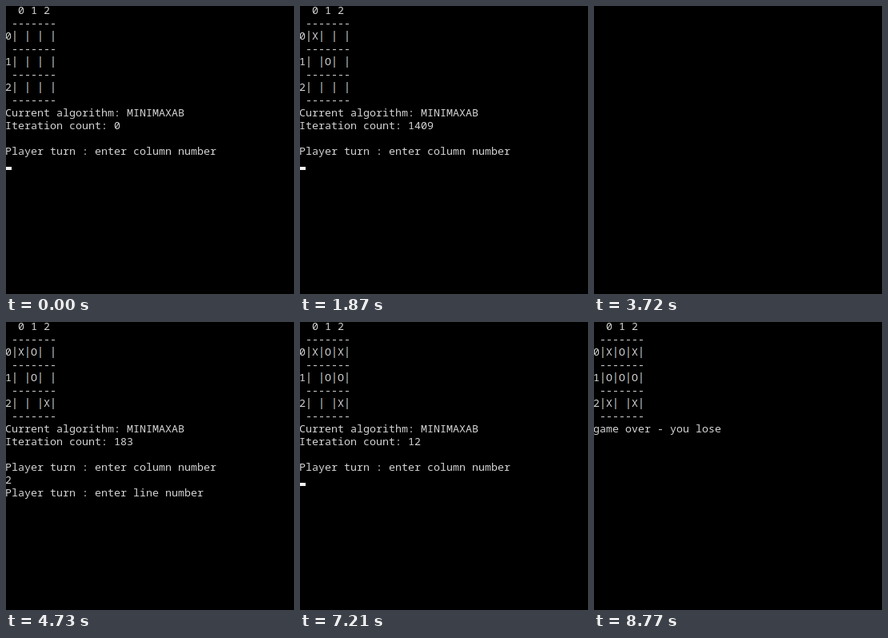
Recreate the animation shown at these times as an HTML page. Size 360 by 360 pixels, loop 9230 ms.

```html
<!DOCTYPE html>
<html>
<head>
<meta charset="utf-8">
<style>
html, body { margin: 0; width: 100%; height: 100%; overflow: hidden; background: #000; }
pre {
  position: absolute; left: -1px; top: -3px; margin: 0; color: #d4d4d4;
  font: calc(40px / 3)/16px "Noto Sans Mono", "DejaVu Sans Mono", monospace;
}
/* Bars carry the blue and orange fringes of subpixel text */
pre i {
  font-style: normal; font-weight: bold; color: transparent;
  background: linear-gradient(90deg, #68aada 50%, #c48a50 50%);
  -webkit-background-clip: text; background-clip: text;
}
#cursor { position: absolute; width: 8px; height: 4px; background: #f4f4f4; }
</style>
</head>
<body>
<pre id="screen"></pre>
<div id="cursor"></div>
<script>
const LOOP = 9230;
const screenEl = document.getElementById('screen');
const cursorEl = document.getElementById('cursor');

const board = cells => {
  const rule = '\n -------\n';
  const rows = [0, 1, 2].map(r => r + '|' + [...cells.slice(r * 3, r * 3 + 3)].join('|') + '|');
  return '  0 1 2' + rule + rows.join(rule) + rule;
};
const stats = (cells, count) =>
  board(cells) + 'Current algorithm: MINIMAXAB\nIteration count: ' + count + '\n\n';
const ask = (cells, count) => stats(cells, count) + 'Player turn : enter column number\n';
const askLine = (column, cells, count) =>
  ask(cells, count) + column + '\nPlayer turn : enter line number\n';

const start = ['         ', 0];
const second = ['X   O    ', 1409];
const third = ['XO  O   X', 183];
const fourth = ['XOX OO  X', 12];
const over = board('XOXOOOX X') + 'game over - you lose\n';

// [time, text, cursor row (-1 when hidden), cursor column]
const steps = [
  [0, ask(...start), 12],
  [930, ask(...start), -1],
  [1410, ask(...start), 12],
  [1560, askLine(0, ...start), 14],
  [1710, '', 0],
  [1790, stats(...second), -1],
  [1870, ask(...second), 12],
  [2480, ask(...second), -1],
  [3030, ask(...second), 12],
  [3490, ask(...second) + 2, 12, 1],
  [3570, askLine(2, ...second), -1],
  [3720, '', -1],
  [3800, stats(...third), 10],
  [3870, ask(...third), 12],
  [4580, ask(...third), -1],
  [4730, askLine(2, ...third), -1],
  [4960, '', -1],
  [5040, stats(...fourth), 10],
  [5120, ask(...fourth), 12],
  [5650, ask(...fourth), -1],
  [6120, ask(...fourth), 12],
  [6660, ask(...fourth), -1],
  [7210, ask(...fourth), 12],
  [7380, askLine(0, ...fourth), 14],
  [7680, over, -1],
  [7760, over, 9],
  [8770, over, -1]
];

let shown;
function draw() {
  const t = performance.now() % LOOP;
  const step = steps.findLast(s => s[0] <= t);
  if (step !== shown) {
    shown = step;
    const [, text, row, column = 0] = step;
    screenEl.innerHTML = text.replaceAll('|', '<i>|</i>');
    cursorEl.hidden = row < 0;
    cursorEl.style.left = column * 8 - 1 + 'px';
    cursorEl.style.top = row * 16 + 9 + 'px';
  }
  requestAnimationFrame(draw);
}
draw();
</script>
</body>
</html>
```
